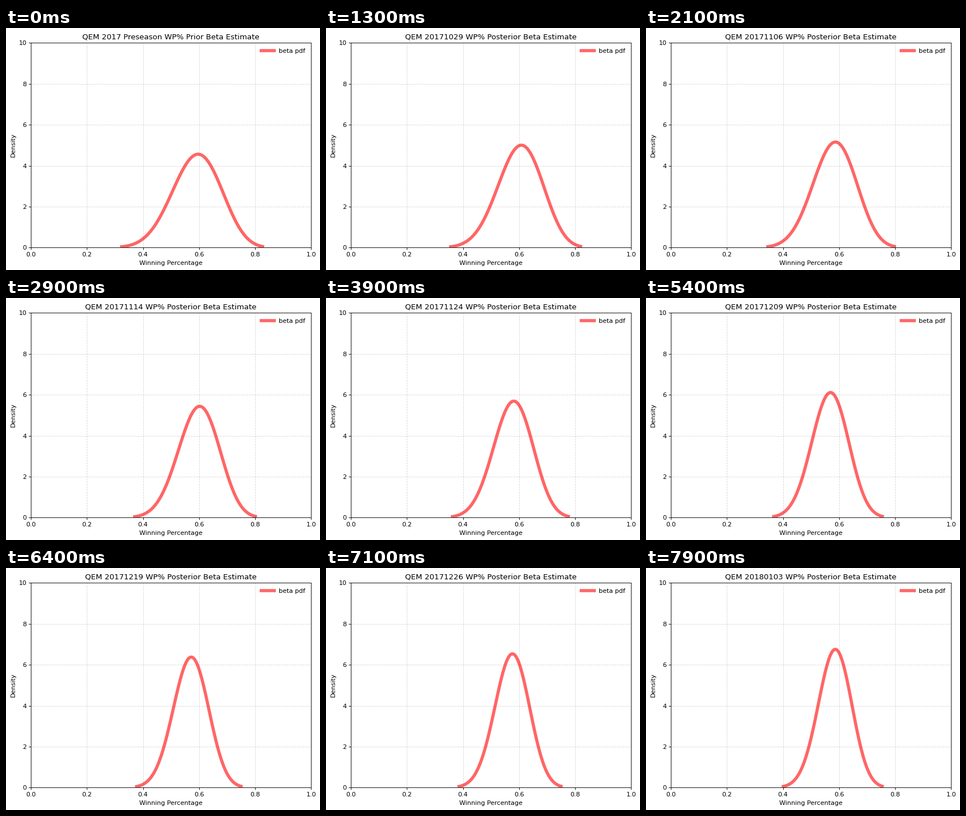
Animation, 556 px wide and 428 px high, one loop 8 s. Source, as a matplotlib script:

```python
import math

import matplotlib.pyplot as plt
import numpy as np
from matplotlib.animation import FuncAnimation

W, H, DPI = 556, 428, 80
FRAMES, STEP_MS = 80, 100
TEAM = "QEM"

PRIOR_A, PRIOR_B = 18.9, 13.1
DAY_ZERO = np.datetime64("2017-10-16")
# Game days, counted from DAY_ZERO
WINS = np.array([2, 4, 7, 13, 20, 24, 26, 28, 32, 35, 43, 46,
                 50, 52, 58, 60, 64, 68, 70, 74, 76, 79])
LOSSES = np.array([9, 11, 16, 18, 22, 30, 34, 37, 40, 44, 49, 54,
                   57, 62, 67, 72])

GRID = np.linspace(0.0005, 0.9995, 4000)


def beta_pdf(x, a, b):
    log_norm = math.lgamma(a + b) - math.lgamma(a) - math.lgamma(b)
    return np.exp(log_norm + (a - 1) * np.log(x) + (b - 1) * np.log1p(-x))


def beta_curve(a, b, tail=0.001):
    """Density between the lower and upper tail quantiles."""
    cdf = np.cumsum(beta_pdf(GRID, a, b))
    lo, hi = np.interp([tail, 1 - tail], cdf / cdf[-1], GRID)
    x = np.linspace(lo, hi, 100)
    return x, beta_pdf(x, a, b)


def title_text(day):
    if day == 0:
        return f"{TEAM} 2017 Preseason WP% Prior Beta Estimate"
    stamp = str(DAY_ZERO + day).replace("-", "")
    return f"{TEAM} {stamp} WP% Posterior Beta Estimate"


plt.rcParams["font.family"] = "DejaVu Sans"
fig = plt.figure(figsize=(W / DPI, H / DPI), dpi=DPI, facecolor="white")
ax = fig.add_axes([44.2 / W, 39.51 / H, 496 / W, 362.4 / H])
ax.set(xlim=(0, 1), ylim=(0, 10),
       xlabel="Winning Percentage", ylabel="Density")
ax.grid(linestyle="--", alpha=0.5)

line, = ax.plot([], [], "r-", lw=5, alpha=0.6, label="beta pdf")
title = ax.set_title("")
ax.legend(loc="upper right", frameon=False)


def update(day):
    a = PRIOR_A + np.count_nonzero(WINS <= day)
    b = PRIOR_B + np.count_nonzero(LOSSES <= day)
    line.set_data(*beta_curve(a, b))
    title.set_text(title_text(day))
    return line, title


anim = FuncAnimation(fig, update, frames=FRAMES, interval=STEP_MS,
                     repeat=True, repeat_delay=0, blit=False)
plt.show()
```
